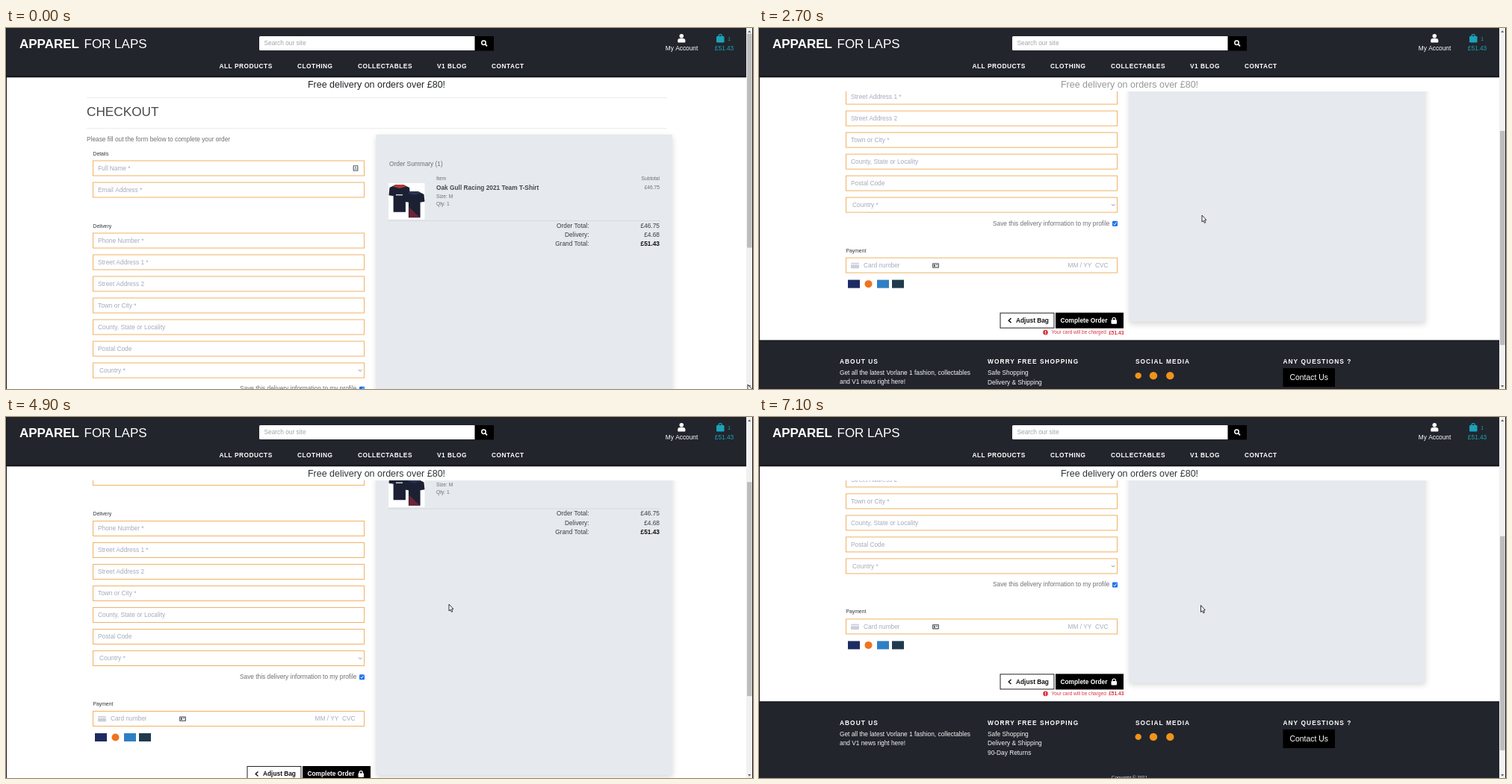
An HTML page with a canvas for the animation above (7.2 s loop, 1000 px wide and 484 px high).

```html
<!DOCTYPE html>
<html lang="en">
<head>
<meta charset="utf-8">
<title>Checkout</title>
<style>
html, body { margin: 0; width: 100%; height: 100%; overflow: hidden; background: #fff; }
canvas { display: block; width: 1000px; height: 484px; }
</style>
</head>
<body>
<canvas id="stage" width="1000" height="484"></canvas>
<script>
const ctx = document.getElementById('stage').getContext('2d');
const LOOP = 7200, STEP = 100;
const FONT = '"Liberation Sans", Arial, sans-serif';
const ORANGE = '#efb264', HINT = '#a3abbd', GREY = '#6d7075', DARK = '#22252c', TEAL = '#1aa3b8', RED = '#dc3545';

// Wheel notches: start time and distance scrolled
const NOTCH = 180;
const notches = [
  [1350, 52], [2000, 52], [2190, 52], [2370, 52], [2639, 52], [2860, 49],
  [4010, -52], [4210, -52], [4480, -52], [4830, -52], [4990, -52], [5170, -49],
  [6050, 52], [6446, 52], [6630, 52], [6780, 52], [6934, 52]
];

const clamp = u => Math.min(1, Math.max(0, u));
const smooth = u => { u = clamp(u); return u * u * (3 - 2 * u); };
const scrollAt = t => notches.reduce((y, [start, d]) => y + d * smooth((t - start) / NOTCH), 0);

function cursorAt(t) {
  const enter = smooth((t - 100) / 750), nudge = smooth((t - 5800) / 300);
  return [993 - 400 * enter - 1.5 * nudge, 478 - 227 * enter + 1.5 * nudge];
}

function box(x, y, w, h, fill) {
  ctx.fillStyle = fill;
  ctx.fillRect(x, y, w, h);
}

function frame(x, y, w, h, color) {
  ctx.strokeStyle = color;
  ctx.lineWidth = 1;
  ctx.strokeRect(x, y, w, h);
}

function dot(x, y, r, fill) {
  ctx.fillStyle = fill;
  ctx.beginPath();
  ctx.arc(x, y, r, 0, 7);
  ctx.fill();
}

function round(x, y, w, h, r, fill) {
  ctx.fillStyle = fill;
  ctx.beginPath();
  ctx.roundRect(x, y, w, h, r);
  ctx.fill();
}

function poly(points, fill) {
  ctx.fillStyle = fill;
  ctx.beginPath();
  points.forEach(([x, y]) => ctx.lineTo(x, y));
  ctx.closePath();
  ctx.fill();
}

function line(points, color, width) {
  ctx.strokeStyle = color;
  ctx.lineWidth = width;
  ctx.beginPath();
  points.forEach(([x, y]) => ctx.lineTo(x, y));
  ctx.stroke();
}

// y is the middle of the capitals
function text(str, x, y, color, { size = 8.33, bold, align = 'left', gap = 0 } = {}) {
  ctx.font = `${bold ? 'bold ' : ''}${size}px ${FONT}`;
  ctx.letterSpacing = gap + 'px';
  ctx.textAlign = align;
  ctx.fillStyle = color;
  ctx.fillText(str, x, y + size * 0.36);
}

function field(label, y, x = 123) {
  box(116, y - 10.5, 364, 21, '#fff');
  frame(116.5, y - 10, 363, 20, ORANGE);
  text(label, x, y, HINT);
}

function form() {
  box(108, 93, 777, 1, '#ececec');
  text('CHECKOUT', 108, 112, '#45474b', { size: 17.2 });
  box(108, 134, 777, 1, '#ececec');
  text('Please fill out the form below to complete your order', 108, 149, GREY);

  const label = { size: 6.8 };
  text('Details', 116.5, 168.5, '#33353a', label);
  text('Delivery', 116.5, 265.5, '#33353a', label);
  text('Payment', 116.5, 520, '#33353a', label);

  field('Full Name *', 188);
  field('Email Address *', 217);
  ['Phone Number *', 'Street Address 1 *', 'Street Address 2', 'Town or City *',
    'County, State or Locality', 'Postal Code'].forEach((name, i) => field(name, 285 + 29 * i));
  field('Country *', 459, 125);
  line([[472, 458], [474.2, 460.2], [476.4, 458]], '#8b8f98', 1);

  round(464.5, 184, 7, 8, 1, '#7c828c');
  box(466, 185.3, 4, 5.4, '#fff');
  dot(468, 187, 1, '#7c828c');
  box(466.5, 188.6, 3, 1.2, '#7c828c');

  text('Save this delivery information to my profile', 313, 483.5, GREY);
  round(473, 480.7, 7, 7, 1.2, '#1a73e8');
  line([[474.5, 484.2], [476, 485.8], [478.7, 482.3]], '#fff', 1);
}

function payment() {
  field('Card number', 540, 140);
  round(123, 536.5, 11, 7.5, 1, '#c9cfdb');
  box(123, 538, 11, 1.5, '#eef0f5');
  round(232, 537, 9, 6.5, 1, '#5f636b');
  box(233.3, 538.3, 6.4, 4, '#fff');
  box(234, 538.8, 2, 3, '#5f636b');
  box(237, 539, 2, 1, '#5f636b');
  text('MM / YY', 413.5, 540, HINT);
  text('CVC', 450, 540, HINT);

  box(119, 559.5, 16, 11, '#1d2b63');
  dot(146.5, 565, 5, '#f0731f');
  box(158, 559.5, 16, 11, '#2f7fc4');
  box(178, 559.5, 16, 11, '#1f3a4d');

  frame(323, 604, 72, 20, '#222');
  line([[337.5, 611], [334.2, 614], [337.5, 617]], '#111', 1.4);
  text('Adjust Bag', 344, 614, '#111', { bold: true });
  box(397, 603.5, 91, 21, '#000');
  text('Complete Order', 403.5, 614, '#fff', { bold: true });
  round(471.5, 613, 7.5, 5.5, 1, '#fff');
  ctx.strokeStyle = '#fff';
  ctx.lineWidth = 1.2;
  ctx.beginPath();
  ctx.arc(475.2, 612.2, 2.1, Math.PI, 0);
  ctx.lineTo(477.3, 614);
  ctx.moveTo(473.1, 612.2);
  ctx.lineTo(473.1, 614);
  ctx.stroke();

  dot(383.5, 630, 3.3, RED);
  box(383, 628, 1, 2.5, '#fff');
  box(383, 631.2, 1, 1, '#fff');
  text('Your card will be charged', 391.5, 630, RED, { size: 6.55 });
  text('£51.43', 488.5, 630, RED, { size: 6.67, bold: true, align: 'right' });
}

function shirt(x, y, k, trim) {
  const at = pts => pts.map(([a, b]) => [x + a * k, y + b * k]);
  poly(at([[8, 0], [18, 0], [26, 4], [27, 14], [21, 15], [21, 36], [5, 36], [5, 15], [-1, 14], [0, 4]]), '#1b2133');
  poly(at([[8, 0], [18, 0], [22, 2.5], [13, 5], [4, 2.5]]), trim);
}

function product() {
  box(512, 208, 48.5, 48.5, '#fff');
  shirt(513.5, 210, 1.02, '#b03a35');
  box(522, 223, 9, 1.5, '#c9ccd4');
  shirt(534, 219, 0.98, '#2b3350');
  poly([[539.5, 240], [554, 254], [539.5, 254]], '#6b2337');
}

function summary() {
  ctx.save();
  ctx.shadowColor = 'rgba(0,0,0,.16)';
  ctx.shadowBlur = 8;
  ctx.shadowOffsetY = 3;
  box(495.5, 143, 396.5, 472.5, '#e6e9ee');
  ctx.restore();

  const small = { size: 6.67 }, right = { align: 'right' };
  text('Order Summary (1)', 513, 182, GREY);
  text('Item', 576, 202, GREY, small);
  text('Subtotal', 875, 202, GREY, { ...small, ...right });
  product();
  text('Oak Gull Racing 2021 Team T-Shirt', 576, 214.5, '#46494f', { bold: true });
  text('£46.75', 875, 213.5, GREY, { ...small, ...right });
  text('Size: M', 576, 226, GREY, small);
  text('Qty: 1', 576, 236, GREY, small);
  box(512, 258, 364, 1, '#d6d9de');
  [['Order Total:', '£46.75'], ['Delivery:', '£4.68'], ['Grand Total:', '£51.43']].forEach(([name, sum], i) => {
    const y = 264.7 + 12.4 * i;
    text(name, 780.5, y, '#3a3d42', right);
    text(sum, 875, y, i < 2 ? '#3a3d42' : '#111', { ...right, bold: i === 2 });
  });
}

function footer() {
  box(1, 640.5, 990, 160, DARK);
  box(1, 640.5, 990, 1.5, '#181a20');
  [['ABOUT US', 108], ['WORRY FREE SHOPPING', 306], ['SOCIAL MEDIA', 504], ['ANY QUESTIONS ?', 701.5]]
    .forEach(([title, x]) => text(title, x, 668.7, '#fff', { bold: true, gap: 1.04 }));
  text('Get all the latest Vorlane 1 fashion, collectables', 108, 684, '#f4f4f5');
  text('and V1 news right here!', 108, 696.3, '#f4f4f5');
  ['Safe Shopping', 'Delivery & Shipping', '90-Day Returns']
    .forEach((item, i) => text(item, 306, 684 + 12.4 * i, '#f4f4f5'));
  dot(507.7, 688, 4.2, '#ef941b');
  dot(528, 688, 5.2, '#ef941b');
  dot(550.3, 688, 5.2, '#ef941b');
  box(701.5, 678, 69.5, 25, '#000');
  text('Contact Us', 710.5, 690.5, '#fff', { size: 10.4 });
  text('Copyright © 2021', 496, 742, '#e8e8ea', { size: 6.15, align: 'center' });
}

function banner(t) {
  box(1, 66, 990, 19, '#fff');
  ctx.globalAlpha = 0.6 + 0.4 * Math.cos(t / 1000 * 2 * Math.PI);
  text('Free delivery on orders over £80!', 496, 75.7, '#212529', { size: 12.5, align: 'center' });
  ctx.globalAlpha = 1;
}

function header() {
  box(1, 0, 990, 66, DARK);
  box(1, 64, 990, 2.3, '#15171c');
  text('APPAREL', 18, 20.5, '#fff', { size: 17, bold: true });
  text('FOR LAPS', 104.5, 20.5, '#fff', { size: 17 });

  round(339, 11, 290, 19, 1.5, '#fff');
  text('Search our site', 345.5, 20.5, '#a0a4ab');
  box(627.5, 11, 25.5, 19.5, '#000');
  ctx.strokeStyle = '#fff';
  ctx.lineWidth = 1.5;
  ctx.beginPath();
  ctx.arc(639.5, 19.8, 2.7, 0, 7);
  ctx.stroke();
  line([[641.4, 21.7], [644, 24.3]], '#fff', 1.7);

  [['ALL PRODUCTS', 285.5], ['CLOTHING', 390], ['COLLECTABLES', 471], ['V1 BLOG', 577], ['CONTACT', 650]]
    .forEach(([item, x]) => text(item, x, 51.3, '#fff', { bold: true, gap: 0.5 }));

  dot(904.3, 10.8, 2.8, '#fff');
  round(899.2, 14, 10.2, 5.5, [3, 3, 1, 1], '#fff');
  text('My Account', 904.5, 26.7, '#fff', { align: 'center' });

  round(951, 11, 10.5, 8.5, 1.2, TEAL);
  ctx.strokeStyle = TEAL;
  ctx.lineWidth = 1.2;
  ctx.beginPath();
  ctx.arc(956.2, 11, 2.3, Math.PI, 0);
  ctx.stroke();
  text('1', 966.3, 15, TEAL, { size: 6.67 });
  text('£51.43', 961.5, 26.7, TEAL, { align: 'center' });
}

function scrollbar(y) {
  box(991, 0, 8, 484, '#f1f1f1');
  box(992, 7.5 + 0.588 * y, 6.5, 287, '#bdbdbd');
  poly([[993, 6], [995.2, 3.2], [997.4, 6]], '#6a6a6a');
  poly([[993, 479], [995.2, 481.8], [997.4, 479]], '#6a6a6a');
  box(0, 0, 1, 484, '#17181c');
  box(999, 0, 1, 484, '#17181c');
}

function cursor([x, y]) {
  const arrow = [[0, 0], [0, 9], [2, 7.3], [3.4, 10.4], [4.9, 9.7], [3.5, 6.7], [5.8, 6.4]]
    .map(([a, b]) => [x + a, y + b]);
  poly(arrow, '#fff');
  line([...arrow, arrow[0]], '#1b1b1b', 0.9);
}

function draw(t) {
  const y = scrollAt(t);
  box(0, 0, 1000, 484, '#fff');
  ctx.save();
  ctx.translate(0, -y);
  form();
  payment();
  summary();
  footer();
  ctx.restore();
  banner(t);
  header();
  scrollbar(y);
  cursor(cursorAt(t));
}

const begin = performance.now();
function tick() {
  const t = (performance.now() - begin) % LOOP;
  draw(Math.floor(t / STEP) * STEP);
  requestAnimationFrame(tick);
}
tick();
</script>
</body>
</html>
```
